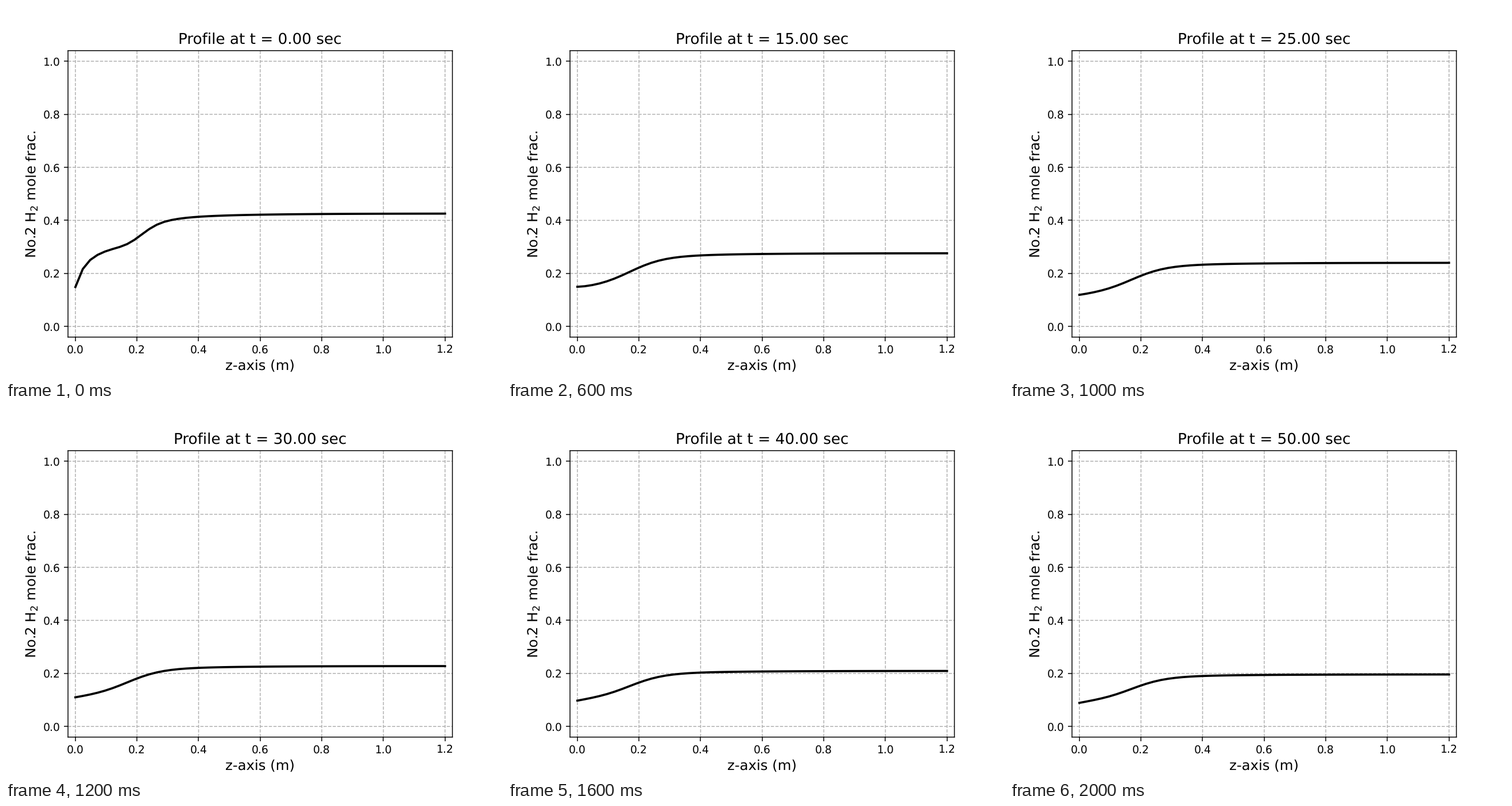
Animation of 864x648 px, one loop 2.1 s. Source, as a matplotlib script:

```python
import numpy as np
import matplotlib.pyplot as plt
from matplotlib.animation import FuncAnimation

plt.rcParams.update({
    "font.family": "DejaVu Sans",
    "text.hinting": "none",
    "path.snap": False,
})

FRAMES, INTERVAL = 21, 100
DT = 2.5          # simulated seconds per frame
LENGTH = 1.2      # column length in m
Z = np.linspace(0, LENGTH, 51)


def plateau(t):
    """Mole fraction far from the inlet, falling ever more slowly."""
    return 1 / (2.3485 + 1.98 * np.log(1 + 0.06012 * t))


def deficit(t):
    """Relative drop below the plateau along the column."""
    front = (0.35 + 0.038 * np.log((t + 2.5) / 10)) / (1 + np.exp((Z - 0.172) / 0.0545))
    tail = 0.138 * np.exp(-Z / 0.23)
    inlet = (0.1775 * np.exp(-t / 12) - 0.015) * np.exp(-Z / 0.05)
    # Steep inlet layer and shoulder that wash out right after the start
    layer = 0.39 * np.exp(-Z / 0.033)
    shoulder = 0.055 * np.exp(-((Z - 0.18) / 0.0454) ** 2 / 2)
    return front + tail - inlet + (layer + shoulder) * np.exp(-t / 1.3)


def profile(t):
    return plateau(t) * (1 - deficit(t))


fig, ax = plt.subplots(figsize=(6.4, 4.8), dpi=135)
line, = ax.plot(Z, profile(0), color="black", linewidth=2)
ax.set_xlim(-0.02 * LENGTH, 1.02 * LENGTH)
ax.set_ylim(-0.04, 1.04)
ax.set_xlabel("z-axis (m)", fontsize=13)
ax.set_ylabel("No.2 H$_2$ mole frac.", fontsize=13, labelpad=3.4)
ax.grid(linestyle="--")
title = ax.set_title("", fontsize=14)


def update(frame):
    t = frame * DT
    line.set_ydata(profile(t))
    title.set_text(f"Profile at t = {t:.2f} sec")
    return line, title


anim = FuncAnimation(fig, update, frames=FRAMES, interval=INTERVAL,
                     repeat=True, repeat_delay=0, blit=False)
plt.show()
```
